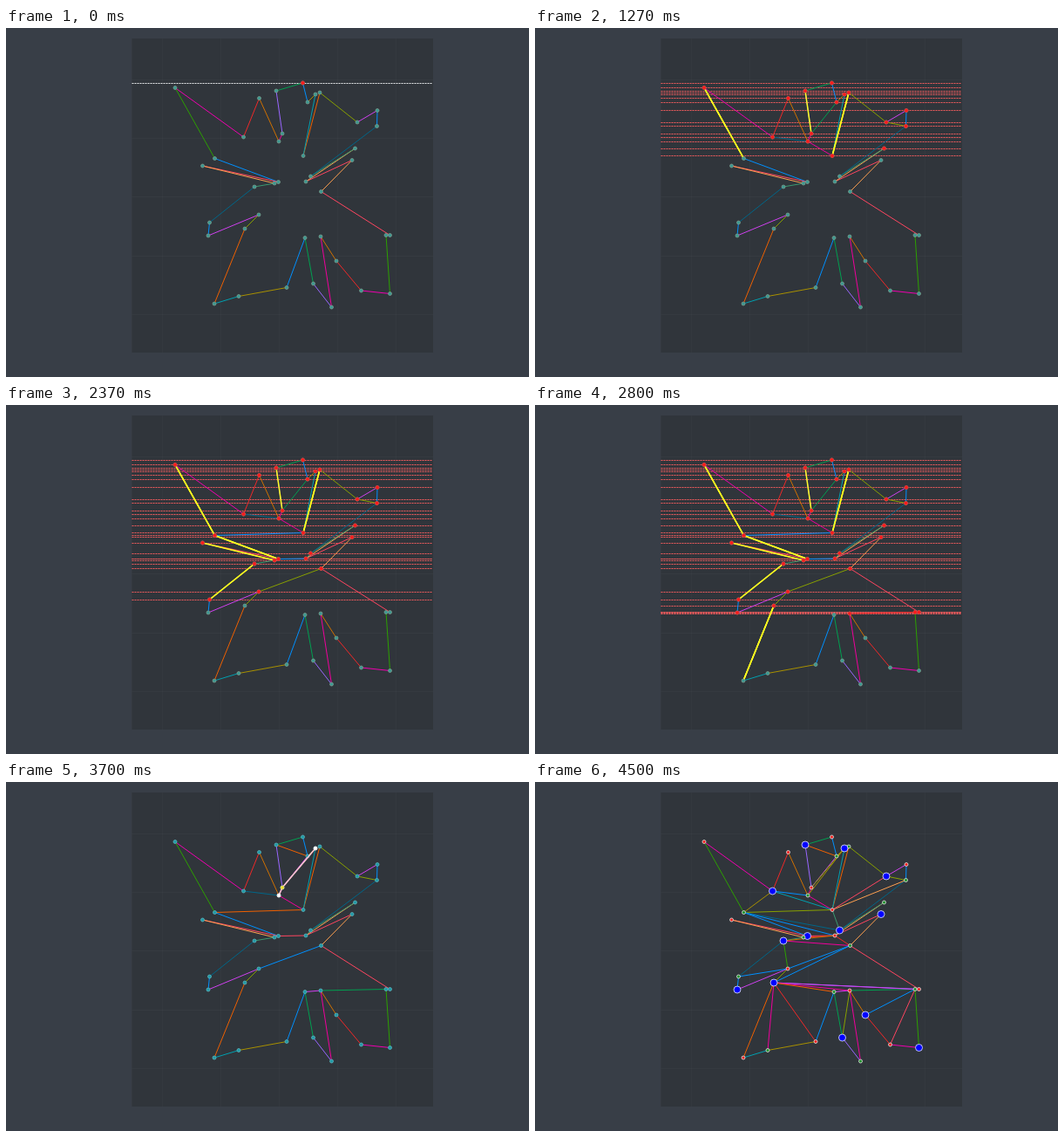
An HTML page with a canvas that plays this animation: 600x400 px, repeating every 5510 ms.

```html
<!DOCTYPE html>
<html lang="en">
<head>
<meta charset="utf-8">
<title>Polygon triangulation and guards</title>
<style>
html, body { margin: 0; width: 100%; height: 100%; overflow: hidden; background: #383e47; }
canvas { display: block; }
</style>
</head>
<body>
<canvas id="stage" width="600" height="400"></canvas>
<script>
const ctx = document.getElementById('stage').getContext('2d');
const LOOP = 5510, FRAME = 100 / 3;
const SPLIT_END = 108, GUARDS_START = 135;

// Polygon corners, named A..Z then a..n in boundary order
const NAMES = 'ABCDEFGHIJKLMNOPQRSTUVWXYZabcdefghijklmn';
const points = {};
`340.5,63 310,72 317,121 313,130 290.5,80.5 272.5,125 194,68.5 239.5,149.5
312.5,176.5 225.5,158 308,178 285,182 233.5,223 232,238 290,214 274,230
239,316 267,307.5 322,297.5 343,240.5 352.5,293 373.5,320 361,239 379,267
407.5,301 440.5,304.5 436,237.5 440.5,237.5 361.5,187.5 397,151.5 344,176
400.5,138 349.5,170 425.5,112.5 426,94.5 403,108 360,74 341,146.5 355,76 346,85`
  .split(/\s+/).forEach((pair, i) => { points[NAMES[i]] = pair.split(',').map(Number); });

const PALETTE = ['#00a050', '#9966ff', '#f0009c', '#d07000', '#f02828', '#f000b0', '#2ca000',
  '#0090ff', '#ff4560', '#ffa050', '#3a9a70', '#006688', '#d040f0', '#88a000', '#f06000',
  '#00a0b0', '#a89000'];
const color = key => PALETTE[parseInt(key, 17)];
const EDGE_COLORS = '0123456789ab7cdefg701234567898 9ab7cdefg7'.replace(' ', '');

// Sweep events: corner : edge found to its left : diagonal with colour
let start = 0;
const events = (`A G B k m E n:BC i j:kl h:kl:jhd C::Cn0 F:GH D:GH:FDb f l:GH:Dl2 H::lH7 d J
g:HI e:HI:ega I:JK:eI7 K::IK8 L c:LM O:LM:cOd M P b:PQ a:PQ N W:PQ:Wa4 T:PQ:TW7
X U S:PQ Y Z R:PQ Q V`).split(/\s+/).map(text => {
  const [corner, edge, diagonal] = text.split(':');
  const event = { corner, edge, diagonal, start };
  event.cutAt = start + (edge ? 2 : 1);
  start += 2 + (edge ? 1 : 0) + (diagonal ? 1 : 0);
  return event;
});

// Triangulation steps: stack with current corner : diagonal with colour
const steps = (`ABn:Bne mnC:Cmd mCD:Dmg kjhl:lh9 kjhl:lj8 hlHg:Hgb hlHg:lga Hge:He7
deIK:Ke4 deKL:Le3 deLc:cL2 deLc:ce4 LcO:LO6 LOM:MO7 GFDl:Flf GFlH:HFg
cOP:Pc7 cPb:Pb1 Pba:Pac PaW:PW2 PWT:PTe PTS:PS4 PSR:PR2 WTU:WUd aWX:aX7 aXY:aY8`)
  .split(/\s+/).map(text => text.split(':'));
const CUTS = 'Cnc jhd Dl2 ega eI8 IK8 cO7 Wa0 TWc'.split(' ');
const FAN_DONE = 16;

const GUARDS = 'BmFjgdILNPUXZ', REDS = 'GAEiCleJOQSWbY';

function path(names, stroke, width = 1) {
  ctx.strokeStyle = stroke;
  ctx.lineWidth = width;
  ctx.beginPath();
  for (const name of names) ctx.lineTo(...points[name]);
  ctx.stroke();
}

const diagonal = text => path(text.slice(0, 2), color(text[2]));

function dot(name, fill, stroke, radius = 2) {
  ctx.beginPath();
  ctx.arc(...points[name], radius, 0, 2 * Math.PI);
  ctx.fillStyle = fill;
  ctx.fill();
  ctx.strokeStyle = stroke;
  ctx.lineWidth = 0.8;
  ctx.stroke();
}

function level(y, stroke) {
  ctx.setLineDash([2, 1]);
  ctx.strokeStyle = stroke;
  ctx.lineWidth = 1;
  ctx.beginPath();
  ctx.moveTo(144.5, Math.floor(y) + 0.5);
  ctx.lineTo(489.5, Math.floor(y) + 0.5);
  ctx.stroke();
  ctx.setLineDash([]);
}

function background() {
  ctx.fillStyle = '#383e47';
  ctx.fillRect(0, 0, 600, 400);
  ctx.fillStyle = '#30353b';
  ctx.fillRect(144.5, 12, 345.5, 360);
  ctx.fillStyle = 'rgba(255,255,255,0.025)';
  for (let i = 0; i < 5; i++) {
    ctx.fillRect(Math.round(179 + i * 67.1), 12, 1, 360);
    ctx.fillRect(144.5, Math.round(59 + i * 67.2), 345.5, 1);
  }
}

function outline() {
  [...NAMES].forEach((name, i) =>
    path(name + NAMES[(i + 1) % NAMES.length], color(EDGE_COLORS[i])));
}

function drawSweep(frame) {
  const seen = events.filter(e => e.start <= frame);
  for (const e of seen) level(points[e.corner][1], e.start === frame ? '#e4e6e8' : '#ee5a5c');
  outline();
  for (const e of seen) if (e.diagonal && e.cutAt <= frame) diagonal(e.diagonal);
  for (const e of seen) if (e.edge && e.start < frame) path(e.edge, '#ffff20', 1.5);
  for (const name of NAMES) dot(name, '#3a9a94', '#7a9c8c');
  for (const e of seen) dot(e.corner, '#ff1a1a', '#e03030');
}

function drawTriangles(frame) {
  const step = frame - SPLIT_END - 1;
  outline();
  CUTS.forEach(diagonal);
  diagonal(step < FAN_DONE ? 'lHe' : 'lHd');
  diagonal(step < FAN_DONE ? 'FDb' : 'FD7');
  steps.slice(0, Math.max(step, 0)).forEach(s => diagonal(s[1]));

  if (frame >= GUARDS_START) {
    for (const name of NAMES) {
      if (GUARDS.includes(name)) dot(name, '#0000ff', '#e8ecff', 4);
      else dot(name, REDS.includes(name) ? '#f02020' : '#20902c', '#e0e4e0');
    }
    return;
  }
  for (const name of NAMES) dot(name, '#1f9aa8', '#5cb4bc');
  if (!steps[step]) return;
  const stack = steps[step][0];
  path(stack, '#ffc4d4', 1.6);
  [...stack].forEach((name, i) => {
    const end = i === 0 || i === stack.length - 1;
    dot(name, end ? '#ffffff' : '#f0e020', end ? '#ffe8e8' : '#d8d880');
  });
}

function draw(now) {
  const frame = Math.floor((now % LOOP + 4) / FRAME);
  background();
  if (frame < SPLIT_END) drawSweep(frame);
  else drawTriangles(frame);
}

const origin = performance.now();
function tick() {
  draw(performance.now() - origin);
  requestAnimationFrame(tick);
}
tick();
</script>
</body>
</html>
```
